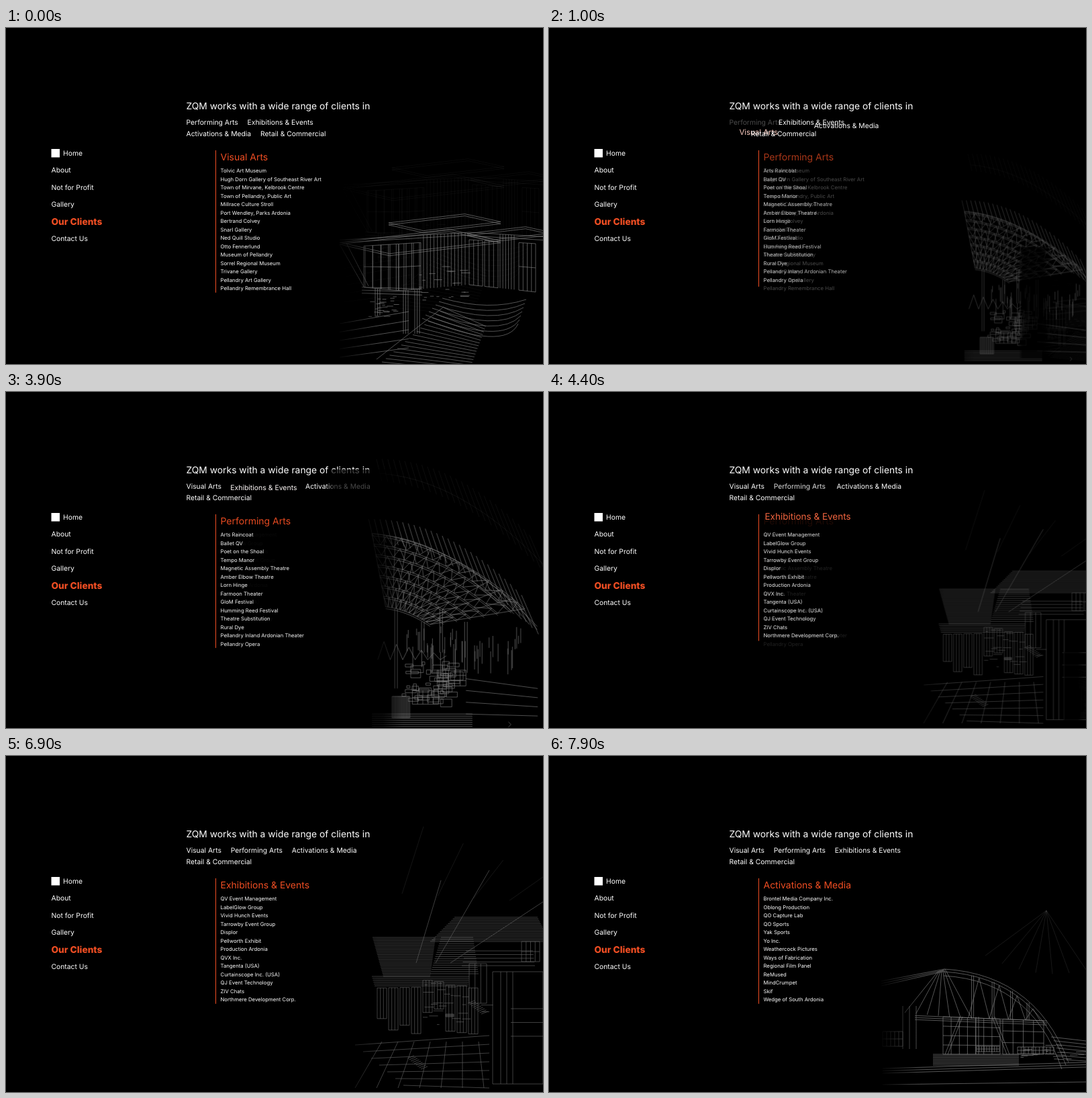
Write an HTML page that moves like this. It is 800 px wide and 500 px high and loops after 8000 ms.

```html
<!DOCTYPE html>
<html lang="en">
<head>
<meta charset="utf-8">
<title>Our Clients</title>
<style>
html, body { margin: 0; width: 100%; height: 100%; overflow: hidden; background: #000; }
svg {
  display: block; width: 100vw; height: 100vh;
  font-family: Inter, "Open Sans", sans-serif; fill: #fff; text-rendering: geometricPrecision;
  --orange: #f04e23;
  --t0: none; --t1: none; --t2: none; --t3: none;
  --o0: 1; --o1: 1; --o2: 1; --o3: 1;
  --c0: #fff; --c1: #fff; --c2: #fff; --c3: #fff;
}
.heading { font-size: 13.85px; }
.menu, .topic { font-size: 10.35px; }
.menu .current { font-size: 13.7px; font-weight: 800; fill: var(--orange); }
.list { font-size: 7.75px; }
.list .title { font-size: 14px; fill: var(--orange); }
.scene path { fill: none; stroke-width: .65; }
.scene, .strip { transform-origin: 870px 485px; }
.rule { transform-origin: 0 182px; --c0: var(--orange); --c1: var(--orange); --c2: var(--orange); --c3: var(--orange); }
.anim { animation: states 8s ease-in-out infinite; }
.strip { animation: strip 8s ease-in-out infinite; }

/* four page states, held between three transitions */
@keyframes states {
  0% { transform: var(--t0); opacity: var(--o0); fill: var(--c0); }
  20%, 47.5% { transform: var(--t1); opacity: var(--o1); fill: var(--c1); }
  57.5%, 88.75% { transform: var(--t2); opacity: var(--o2); fill: var(--c2); }
  98.75%, 100% { transform: var(--t3); opacity: var(--o3); fill: var(--c3); }
}
/* dark edge of the leaving picture passes above the text */
@keyframes strip {
  0%, .8%, 47.5%, 88.75% { transform: scale(1); opacity: 0; }
  .81%, 47.51%, 88.76% { transform: scale(1); opacity: .72; }
  20%, 57.5%, 98.75% { transform: scale(.15); opacity: .72; }
  20.01%, 57.51%, 98.76%, 100% { transform: scale(1); opacity: 0; }
}
</style>
</head>
<body>
<svg id="stage" viewBox="0 0 800 500">
  <defs>
    <linearGradient id="fade">
      <stop offset="0"/><stop offset=".25"/><stop offset="1" stop-opacity="0"/>
    </linearGradient>
    <linearGradient id="edge">
      <stop offset="0" stop-opacity="0"/><stop offset=".1"/><stop offset=".75"/><stop offset="1" stop-opacity="0"/>
    </linearGradient>
  </defs>
  <g id="scenes"></g>
  <g class="menu">
    <rect x="67.5" y="180" width="12.5" height="12.5"/>
    <text x="85" y="189.7">Home</text>
    <text x="67.5" y="215">About</text>
    <text x="67.5" y="240.5">Not for Profit</text>
    <text x="67.5" y="266">Gallery</text>
    <text x="67.5" y="292.5" class="current">Our Clients</text>
    <text x="67.5" y="317">Contact Us</text>
  </g>
  <text class="heading" x="268.5" y="121">ZQM works with a wide range of clients in</text>
  <rect id="rule" class="rule anim" x="312" y="182" width="1" height="1"/>
  <g id="lists"></g>
  <g id="topics"></g>
  <rect class="strip" x="465" y="105" width="118" height="395" fill="url(#edge)"/>
</svg>
<script>
const byId = id => document.getElementById(id);

function add(parent, tag, attrs = {}, text = '') {
  const el = document.createElementNS('http://www.w3.org/2000/svg', tag);
  for (const key in attrs) el.setAttribute(key, attrs[key]);
  el.textContent = text;
  parent.append(el);
  return el;
}

// sets --t0..--t3, --o0..--o3 or --c0..--c3
function setStates(el, letter, values) {
  values.forEach((v, i) => el.style.setProperty(`--${letter}${i}`, v));
}
const states = [0, 1, 2, 3];
const during = test => states.map(s => test(s) ? 1 : 0);

// ---- client lists
const rowStep = 12.52;
const lists = [
  `Tolvic Art Museum|Hugh Dorn Gallery of Southeast River Art|Town of Mirvane, Kelbrook Centre|Town of Pellandry, Public Art|Millrace Culture Stroll|Port Wendley, Parks Ardonia|Bertrand Colvey|Snarl Gallery|Ned Quill Studio|Otto Fennerlund|Museum of Pellandry|Sorrel Regional Museum|Trivane Gallery|Pellandry Art Gallery|Pellandry Remembrance Hall`,
  `Arts Raincoat|Ballet QV|Poet on the Shoal|Tempo Manor|Magnetic Assembly Theatre|Amber Elbow Theatre|Lorn Hinge|Farmoon Theater|GloM Festival|Humming Reed Festival|Theatre Substitution|Rural Dye|Pellandry Inland Ardonian Theater|Pellandry Opera`,
  `QV Event Management|LabelGlow Group|Vivid Hunch Events|Tarrowby Event Group|Displor|Pellworth Exhibit|Production Ardonia|QVX Inc.|Tangenta (USA)|Curtainscope Inc. (USA)|QJ Event Technology|ZIV Chats|Northmere Development Corp.`,
  `Brontel Media Company Inc.|Oblong Production|QO Capture Lab|QO Sports|Yak Sports|Yo Inc.|Weathercock Pictures|Ways of Fabrication|Regional Film Panel|ReMused|MindCrumpet|Skif|Wedge of South Ardonia`
].map(names => names.split('|'));

lists.forEach((names, state) => {
  const group = add(byId('lists'), 'g', { class: 'list anim' });
  setStates(group, 'o', during(s => s === state));
  if (state === 1) add(group, 'text', { class: 'title', x: 319.5, y: 197 }, 'Performing Arts');
  names.forEach((name, i) => add(group, 'text', { x: 319.5, y: 215 + rowStep * i }, name));
});
setStates(byId('rule'), 't', lists.map(names => `scaleY(${24 + rowStep * names.length})`));

// ---- topics: the current one is the title, the rest wrap in rows
const labels = ['Visual Arts', 'Performing Arts', 'Exhibitions & Events', 'Activations & Media', 'Retail & Commercial'];
const topic = text => add(byId('topics'), 'text', { class: 'topic anim' }, text);
const topics = labels.map(topic);
const widths = topics.map(el => el.getComputedTextLength());

function flow(current) {
  let x = 268.5, y = 144;
  return widths.map((width, i) => {
    if (i === current) return [319.5, 197];
    if (x + width > 550) { x = 268.5; y += 17.4; }
    const place = [x, y];
    x += width + 13.8;
    return place;
  });
}
const layouts = states.map(flow);

function place(el, index, stateOf, opacity) {
  const isTitle = s => stateOf(s) === index;
  setStates(el, 't', states.map(s => {
    const [x, y] = layouts[stateOf(s)][index];
    return `translate(${x}px, ${y}px) scale(${isTitle(s) ? 1.35 : 1})`;
  }));
  setStates(el, 'c', states.map(s => isTitle(s) ? 'var(--orange)' : '#fff'));
  setStates(el, 'o', opacity);
}
topics.forEach((el, i) => {
  if (i !== 1) return place(el, i, s => s, during(() => true));
  // this topic fades instead of travelling
  place(el, i, () => 0, during(s => s === 0));
  place(topic(labels[i]), i, () => 2, during(s => s > 1));
});

// ---- line drawing helpers
const mix = (a, b, t) => +(a + (b - a) * t).toFixed(1);
const rep = (n, f) => Array.from({ length: n }, (_, i) => f(n > 1 ? i / (n - 1) : 0, i)).join('');
const line = (x, y, u, v) => `M${x} ${y}L${u} ${v}`;
const poly = (n, point) => rep(n, (t, i) => (i ? 'L' : 'M') + point(t, i).map(v => v.toFixed(1)).join(' '));
const bars = (n, x0, x1, top, bottom) => rep(n, t => {
  const x = mix(x0, x1, t);
  return line(x, top(x), x, bottom(x));
});
const levels = (n, x0, x1, top, bottom) => rep(n, t =>
  line(x0, mix(top(x0), bottom(x0), t), x1, mix(top(x1), bottom(x1), t)));
const panel = (n, m, ...area) => bars(n, ...area) + levels(m, ...area);
const flat = y => () => y;
const below = (f, d) => x => f(x) + d;

let seed = 7;
const rand = (lo, hi) => {
  seed = seed * 16807 % 2147483647;
  return mix(lo, hi, seed / 2147483647);
};
const dashes = (n, x0, x1, y0, y1, length) => rep(n, () => `M${rand(x0, x1)} ${rand(y0, y1)}h${rand(3, length)}`);

function house() {
  const eave = x => 304 + .06 * Math.abs(x - 690);
  const head = below(eave, 11);
  const sill = x => 391 - .09 * Math.abs(x - 590) + Math.max(0, x - 690) * .2;
  const slab = (x, y, w) => [0, 3].map(d =>
    `M${x} ${y + d}l${.68 * w} ${-.08 * w} ${.32 * w} ${.07 * w} ${-.69 * w} ${.08 * w}z`).join('');
  const columns = [550, 592, 609].map(x => bars(3, x, x + 7, sill, flat(x < 590 ? 428 : 455))).join('');
  const terraces = rep(7, (t, i) =>
    `M${650 - 5 * i} ${402 + 5 * i}Q${720 + 4 * i} ${422 + 10 * i} ${775 - 2 * i} ${404 + 6 * i}`);
  const stairs = rep(17, t => line(mix(652, 560, t), mix(416, 497, t), mix(715, 690, t), mix(444, 510, t)));
  const ground = rep(5, t => line(497, mix(440, 490, t), 600, mix(422, 476, t)));
  return slab(570, 290, 167) + slab(497, 319, 240) + slab(687, 306, 128) + columns + terraces + stairs + ground +
    levels(2, 497, 690, eave, below(eave, 4)) + levels(2, 690, 800, eave, below(eave, 5)) +
    levels(3, 530, 620, sill, below(sill, 9)) +
    panel(5, 3, 533, 585, head, sill) + panel(4, 3, 585, 618, head, sill) + bars(8, 535, 616, head, sill) +
    bars(13, 622, 684, eave, sill) + panel(4, 2, 690, 710, head, sill) + panel(4, 2, 713, 733, head, sill) +
    bars(6, 736, 757, eave, sill) + panel(5, 3, 764, 789, head, sill) +
    line(497, 322, 533, 385) + line(507, 320, 540, 384) + line(652, 415, 552, 493) +
    dashes(26, 540, 580, 398, 432, 10) + dashes(24, 615, 685, 355, 405, 14);
}

function canopy() {
  const rim = t => [537 + 252 * t, 203 + 20 * t + 122 * t * t];
  // s runs from the upper to the lower beam, t along each beam
  const shell = (s, t) => [
    mix(mix(536, 557, s), mix(770, 625, s), t),
    mix(mix(203, 315, s), mix(318, 342, s), t) - mix(90, 20, s) * t * (1 - t)
  ];
  const beams = rep(8, s => [0, 3].map(d => poly(14, t => [shell(s, t)[0], shell(s, t)[1] + d])).join(''));
  const webs = rep(7, (_, k) => poly(22, (t, i) => shell((k + i % 2) / 7, t)));
  const ribs = rep(14, t => poly(5, s => shell(s, t)));
  const spikes = rep(28, t => {
    const [x, y] = rim(t);
    return line(mix(x - 6, x - 24, t), mix(y - 22, y - 48, t), x + 2, y + 12);
  });
  const columns = [571, 612, 640, 678].map((x, i) =>
    bars(2, x, x + 4, flat(318 + i % 2 * 20), flat(i % 3 ? 385 : 440 - 8 * i))).join('');
  const hangers = rep(46, () => `M${rand(585, 765)} ${rand(345, 385)}v${rand(10, 40)}`);
  const rooms = rep(44, () => {
    const w = rand(4, 20), h = rand(3, 14);
    return `M${rand(582, 660)} ${rand(398, 458)}h${w}v${h}h${-w}z`;
  });
  const truss = poly(12, (t, i) => [545 + 105 * t, i % 2 ? 366 + 24 * t : 396]);
  return {
    roof: poly(20, rim) + spikes,
    body: beams + webs + ribs + columns + hangers + rooms + truss +
      rep(6, t => line(mix(690, 750, t), mix(275, 300, t), mix(730, 789, t), mix(310, 350, t))) +
      panel(6, 4, 636, 680, flat(412), flat(436)) + panel(14, 2, 567, 594, flat(452), flat(485)) +
      panel(6, 3, 598, 638, flat(443), flat(464)) + levels(7, 536, 690, flat(479), flat(498)) +
      rep(4, (t, i) => line(680, 425 + 18 * i, 790, 440 + 14 * i)) + 'M745 491l4 4-4 4'
  };
}

function interior() {
  const slats = (n, x, y, w, h, skew) => rep(n, t => line(x + skew * t, y + h * t, x + w - skew * t / 2, y + h * t));
  const frames = rep(9, (t, i) => {
    const x = 553 + 17 * i, top = 333 + rand(0, 14), drop = rand(40, 75);
    return panel(4, 2, x, x + 14, flat(top), flat(top + drop));
  });
  const steps = (x, y) => rep(9, (t, i) => `M${x + 2.5 * i} ${y + 2 * i}l10 -4`);
  const floor = rep(7, (t, i) => line(520 + 12 * i, 430 + 10 * i, 720, 416 + 13 * i) + line(560 + 24 * i, 425, 520 + 32 * i, 494));
  const rays = [[648, 185, 611], [720, 170, 640], [800, 217, 662]].map(([x, y, u]) => line(x, y, u, 308)).join('');
  return rays + frames + floor + steps(688, 368) + steps(598, 450) +
    slats(26, 546, 270, 94, 58, 16) + slats(18, 648, 270, 48, 54, -16) + slats(16, 668, 240, 124, 36, -36) +
    slats(6, 545, 328, 145, 14, 4) + slats(5, 685, 290, 100, 22, -6) +
    panel(2, 2, 725, 800, flat(321), flat(488)) + bars(3, 737, 755, flat(321), flat(488)) +
    levels(3, 752, 800, flat(376), flat(417)) +
    panel(4, 2, 690, 716, flat(309), flat(368)) + panel(5, 3, 768, 795, flat(276), flat(306)) +
    panel(2, 5, 655, 667, flat(384), flat(388)) + dashes(26, 610, 720, 330, 400, 18);
}

function hall() {
  const arch = t => [588 + 274 * t - 88 * t * t, 317 + 16 * t + 123 * t * t];
  const band = x => 388 + .04 * (x - 588);
  const base = flat(444);
  const bows = [0, 4, 10].map(d => poly(16, t => [arch(t)[0] - d * t, arch(t)[1] + d])).join('');
  const truss = poly(9, (_, i) => {
    const [x, y] = arch(.14 + i * .066);
    return [x, i % 2 ? y + 5 : band(x)];
  });
  const posts = rep(4, (_, i) => {
    const [x, y] = arch(.16 + i * .13);
    return bars(2, x, x + 3, flat(y + 4), band);
  });
  const wing = rep(7, t => line(mix(580, 590, t), mix(320, 317, t), mix(530, 630, t), mix(382, 391, t)));
  return bows + truss + posts + wing +
    levels(3, 495, 588, x => 335 - .19 * (x - 495), x => 342 - .23 * (x - 495)) +
    levels(3, 545, 742, band, below(band, 6)) + bars(3, 527, 547, flat(372), flat(436)) +
    panel(8, 5, 587, 672, band, base) + panel(5, 4, 676, 737, band, base) +
    rep(3, t => line(mix(612, 660, t), 388, mix(590, 682, t), 444) + line(mix(616, 664, t), 388, mix(594, 686, t), 444)) +
    panel(10, 3, 637, 671, flat(432), flat(440)) + panel(11, 3, 698, 752, flat(433), flat(443)) +
    levels(8, 572, 700, flat(444), flat(460)) + panel(6, 3, 497, 527, flat(410), flat(432)) +
    rep(7, t => line(mix(748, 770, t), mix(418, 452, t), 800, mix(424, 454, t))) +
    levels(3, 497, 800, x => 465 - .03 * (x - 497), x => 472 - .03 * (x - 497)) +
    line(497, 489, 800, 485) + dashes(22, 700, 790, 430, 452, 18);
}

// faint echoes above the main drawings
const home = house(), stage = canopy();
const farRays = rep(4, t => line(mix(622, 800, t), mix(105, 180, t), mix(590, 750, t), mix(205, 215, t)));
const peak = rep(7, t => line(741, 230, mix(650, 800, t), mix(297, 318, t) + 60 * t * (1 - t)));

[
  { main: home, color: '#838383', echo: home, shift: 'translate(5 -82)', dim: .12 },
  { main: stage.roof + stage.body, color: '#888', echo: stage.roof, shift: 'translate(12 -92)', dim: .2 },
  { main: interior(), color: '#606060', echo: farRays, shift: '', dim: .35 },
  { main: hall(), color: '#848484', echo: peak, shift: '', dim: .28 }
].forEach((drawing, state) => {
  const group = add(byId('scenes'), 'g', { class: 'scene anim' });
  const shown = during(s => s === state);
  setStates(group, 'o', shown);
  setStates(group, 't', shown.map(on => `scale(${on ? 1 : .15})`));
  add(group, 'path', { d: drawing.echo, stroke: drawing.color, transform: drawing.shift, opacity: drawing.dim });
  add(group, 'path', { d: drawing.main, stroke: drawing.color });
  add(group, 'rect', { x: 470, y: 80, width: 85, height: 420, fill: 'url(#fade)' });
});
</script>
</body>
</html>
```
